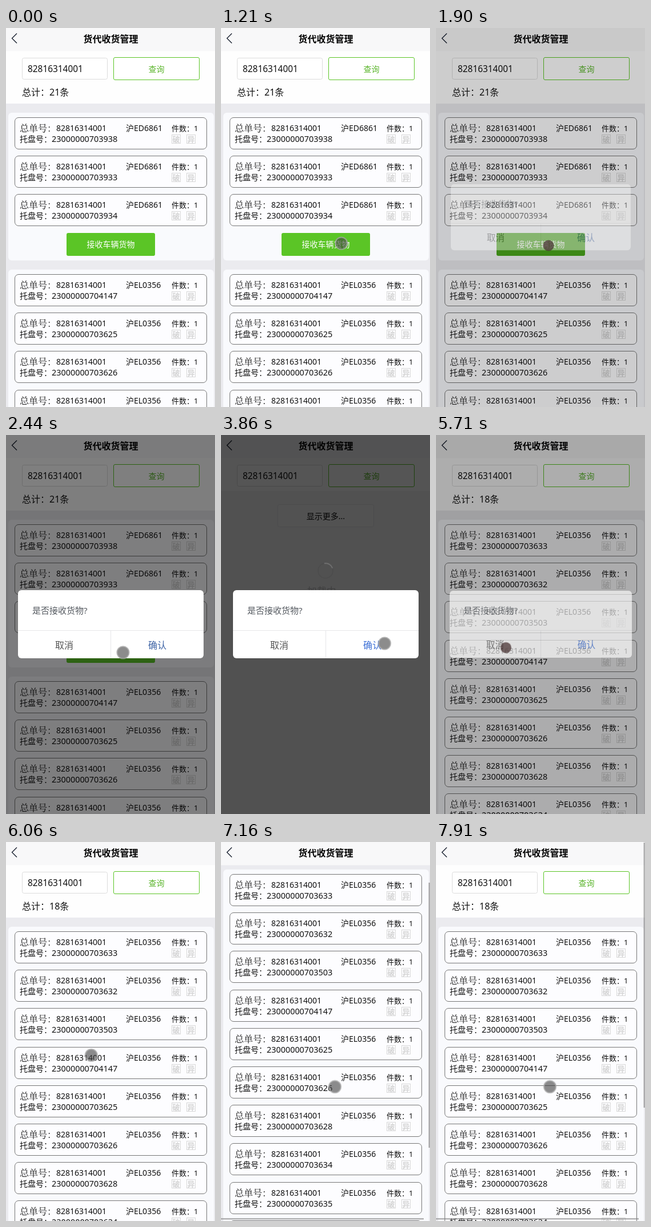
Animation of 366 by 662 pixels, one loop 8000 ms. Source, as an HTML page:

```html
<!DOCTYPE html>
<html lang="zh-CN">
<head>
<meta charset="utf-8">
<title>货代收货管理</title>
<style>
html, body { margin: 0; width: 100%; height: 100%; overflow: hidden; background: #ebebef; }
svg { display: block; width: 366px; height: 662px; font-family: "Noto Sans", "Noto Sans CJK SC", sans-serif; fill: #111; }
.kai { font-family: KaiTi, "Noto Serif CJK SC", "Noto Sans CJK SC", serif; }
.mid { text-anchor: middle; }
.card { fill: #fdfdff; stroke: #777; }
.panel { fill: #f9fafd; }
.badge { fill: none; stroke: #d8d8d8; }
.faint { fill: #d4d4d4; font-weight: bold; }

/* Everything shares one 8 s clock: 1% = 80 ms */
.anim { animation: 8s linear infinite; }
#page { animation-name: scroll; }
#before { animation-name: before; animation-timing-function: step-end; }
#after { animation-name: after; animation-timing-function: step-end; }
#empty { animation-name: empty; animation-timing-function: step-end; }
#receive { animation: receive 8s step-end infinite; }
#mask { animation-name: fade; }
#dialog { animation-name: fade, zoom; transform-origin: 183.5px 330.5px; }
#confirm { animation-name: confirm; animation-timing-function: step-end; }
#loading { animation-name: loading; }
#spinner { animation: spin 1s linear infinite; }
#bars { animation-name: bars; animation-timing-function: step-end; }
#thumb { animation-name: thumb; }
#trace { animation-name: trace; animation-timing-function: step-end; }
#cursor { animation-name: move; }
#idle { animation-name: idle; animation-timing-function: step-end; }
#pressed { animation-name: pressed; animation-timing-function: step-end; }

@keyframes scroll {
  0%, 86.1% { transform: translateY(0); animation-timing-function: ease-in-out; }
  89.5%, 94.4% { transform: translateY(-100px); animation-timing-function: ease-in-out; }
  98.6%, 100% { transform: translateY(0); }
}
@keyframes thumb {
  0%, 86.1% { transform: translateY(0); animation-timing-function: ease-in-out; }
  89.5%, 94.4% { transform: translateY(70px); animation-timing-function: ease-in-out; }
  98.6%, 100% { transform: translateY(0); }
}
@keyframes bars { 0% { opacity: 0; } 86.5%, 100% { opacity: 1; } }
@keyframes before { 0% { opacity: 1; } 47.3%, 100% { opacity: 0; } }
@keyframes empty { 0% { opacity: 0; } 47.3% { opacity: 1; } 54.2%, 100% { opacity: 0; } }
@keyframes after { 0% { opacity: 0; } 54.2%, 100% { opacity: 1; } }
@keyframes receive { 0% { fill: #5bc526; } 21.8% { fill: #4aa81c; } 25%, 100% { fill: #5bc526; } }
@keyframes fade {
  0%, 22.75% { opacity: 0; animation-timing-function: ease-out; }
  26.75%, 70.5% { opacity: 1; animation-timing-function: ease-out; }
  74.25%, 100% { opacity: 0; }
}
@keyframes zoom {
  0%, 22.75% { transform: scale(.95); animation-timing-function: ease-out; }
  26.75%, 70.5% { transform: scale(1); animation-timing-function: ease-out; }
  74.25%, 100% { transform: scale(.95); }
}
@keyframes confirm { 0% { fill: #3f64a6; } 43.1%, 100% { fill: #3d70d6; } }
@keyframes loading { 0%, 47.2% { opacity: 0; } 48%, 54.2% { opacity: 1; } 55.8%, 100% { opacity: 0; } }
@keyframes spin { to { transform: rotate(360deg); } }
@keyframes trace { 0% { opacity: 0; } 60.25% { opacity: 1; } 70.4%, 100% { opacity: 0; } }
@keyframes move {
  0%, 5.74% { transform: translate(328px, 596px); opacity: 0; }
  5.75% { transform: translate(328px, 596px); opacity: 1; }
  9% { transform: translate(275px, 468px); }
  12.5% { transform: translate(222px, 350px); }
  15.1% { transform: translate(211px, 376px); }
  16.8%, 29.6% { transform: translate(197px, 380px); }
  30.4% { transform: translate(204px, 380px); }
  39.7%, 46.4% { transform: translate(280px, 369px); }
  48.2%, 59.5% { transform: translate(286.5px, 364px); }
  67%, 74.6% { transform: translate(122.5px, 371.5px); }
  75.7% { transform: translate(148.5px, 371.5px); }
  79.1% { transform: translate(192px, 421px); }
  80.8%, 100% { transform: translate(199.5px, 427.5px); opacity: 1; }
}
@keyframes idle { 0% { opacity: 1; } 21.8% { opacity: 0; } 25% { opacity: 1; } 69.6% { opacity: 0; } 72%, 100% { opacity: 1; } }
@keyframes pressed { 0% { opacity: 0; } 21.8% { opacity: 1; } 25% { opacity: 0; } 69.6% { opacity: 1; } 72%, 100% { opacity: 0; } }
</style>
</head>
<body>
<svg viewBox="0 0 366 662">
  <rect width="366" height="662" fill="#ebebef"/>
  <g id="page" class="anim">
    <rect y="40" width="366" height="92" fill="#fefefe"/>
    <rect x="28.5" y="52.5" width="149" height="37" rx="3" fill="#fff" stroke="#dcdcdc"/>
    <text x="38" y="77" font-size="15.4">82816314001</text>
    <rect x="188.5" y="51.5" width="150" height="39" rx="2.5" fill="#fff" stroke="#5bc526"/>
    <text class="mid" x="263.5" y="77" font-size="14" fill="#5bb52c">查询</text>
    <g id="before" class="anim"></g>
    <g id="after" class="anim"></g>
    <g id="empty" class="anim">
      <rect y="98" width="366" height="564" fill="#f4f4f6"/>
      <rect x="99.5" y="121.5" width="168" height="39" rx="3" fill="#f8f8f8" stroke="#e4e4e6"/>
      <text class="mid" x="183.5" y="147" font-size="14">显示更多...</text>
    </g>
  </g>
  <rect width="366" height="40.5" fill="#f8f8f9"/>
  <path d="M19 9.5L10.5 18L19 26.5" fill="none" stroke="#1c2433" stroke-width="1.4"/>
  <text class="mid" x="183.5" y="25" font-size="16" font-weight="bold" fill="#000">货代收货管理</text>

  <g id="bars" class="anim" fill="#808080" fill-opacity=".6">
    <rect id="thumb" class="anim" x="363.5" y="1" width="2.5" height="463"/>
    <rect y="657" width="355" height="2.5"/>
  </g>

  <rect id="mask" class="anim" width="366" height="662" fill="#000" fill-opacity=".5"/>
  <g id="loading" class="anim">
    <rect width="366" height="662" fill="#000" fill-opacity=".33"/>
    <g transform="translate(183 237)" fill="none" stroke-width="1.6">
      <circle r="13" stroke="#4c4c4c"/>
      <path id="spinner" d="M8.36 -9.96A13 13 0 0 1 11.26 6.5" stroke="#777"/>
    </g>
    <text class="mid" x="183" y="279" font-size="17" fill="#3e3e3e">加载中...</text>
  </g>

  <g id="dialog" class="anim">
    <rect x="21" y="271" width="325" height="119" rx="6" fill="#fff"/>
    <path d="M21 341.5H346M183.5 342V390" stroke="#e6e6e8"/>
    <text x="46" y="312" font-size="15" fill="#555a60">是否接收货物?</text>
    <text class="mid" x="102" y="373" font-size="16" fill="#555">取消</text>
    <text id="confirm" class="mid anim" x="265" y="373" font-size="16">确认</text>
  </g>

  <path id="trace" class="anim" d="M277 357L284 349H292L299.5 357" fill="none" stroke="#bbb" stroke-width="2"/>
  <g id="cursor" class="anim">
    <g id="idle" class="anim">
      <circle r="10.5" fill="#404040" fill-opacity=".6"/>
      <circle r="10.5" fill="none" stroke="#a8a8a8" stroke-opacity=".8" stroke-width="2"/>
    </g>
    <circle id="pressed" class="anim" r="9.5" fill="#4a3434" fill-opacity=".75"/>
  </g>
</svg>
<script>
const STEP = 67.2;

const text = (x, y, size, str, cls = "") =>
  `<text x="${x}" y="${y}" font-size="${size}" class="${cls}">${str}</text>`;

const badge = (x, str) =>
  `<rect class="badge" x="${x - 7.5}" y="30.5" width="15" height="15"/>` + text(x, 43, 13, str, "mid faint");

const card = (y, plate, pallet) => `<g transform="translate(0 ${Math.round(y)})">
  <rect class="card" x="15.5" y=".5" width="336" height="55" rx="6.5"/>
  ${text(24, 25, 16, "总单号：", "kai")}${text(88, 24, 14, "82816314001")}
  ${text(210, 24, 14, "沪" + plate)}${text(290, 24, 13, "件数：1")}
  ${text(24, 43, 14, "托盘号：")}${text(80, 43, 14.4, "23000000" + pallet)}
  ${badge(298, "破")}${badge(324, "异")}</g>`;

const group = (top, height, plate, pallets) =>
  `<rect class="panel" x="4" y="${top}" width="360" height="${height}" rx="6"/>` +
  pallets.map((pallet, i) => card(top + 8 + i * STEP, plate, pallet)).join("");

const total = n => text(28, 118, 16, `总计：${n}条`);

document.getElementById("before").innerHTML = total(21) +
  group(148, 258, "ED6861", [703938, 703933, 703934]) +
  `<rect id="receive" x="106" y="358" width="155" height="40" rx="3"/>
   <text class="mid" x="183.5" y="383" font-size="14" fill="#fff">接收车辆货物</text>` +
  group(422, 300, "EL0356", [704147, 703625, 703626, 703628]);

document.getElementById("after").innerHTML = total(18) +
  group(148, 760, "EL0356", [703633, 703632, 703503, 704147, 703625, 703626, 703628, 703634, 703635, 703636]);
</script>
</body>
</html>
```
